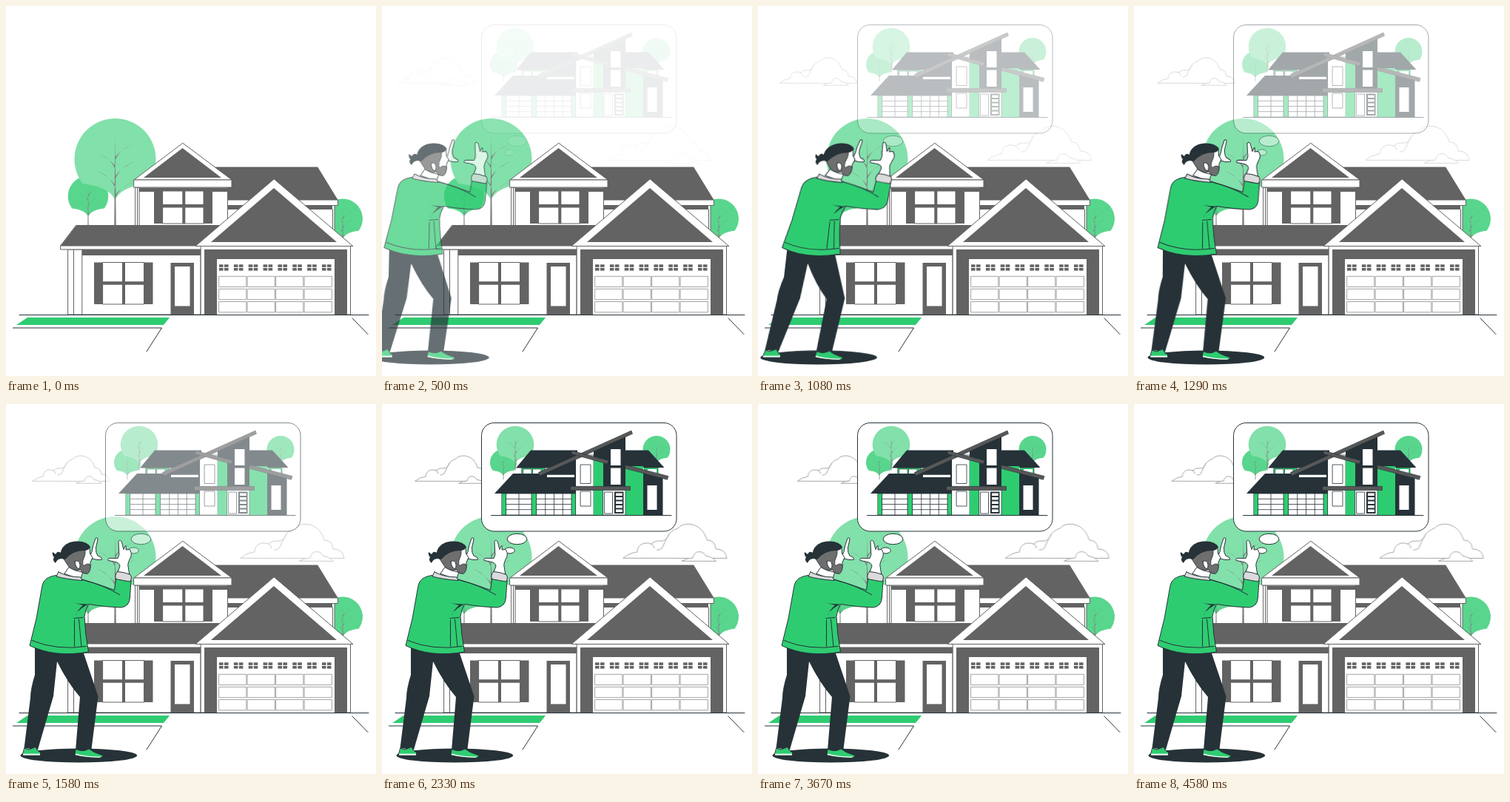
These frames come from a looping animation (500x500 px, 4.62 s). An HTML page:

```html
<!DOCTYPE html>
<html lang="en">
<head>
<meta charset="utf-8">
<title>Dream house</title>
<style>
html, body { margin: 0; width: 100%; height: 100%; overflow: hidden; background: #fff; }
svg { display: block; width: 100%; height: 100%; }
#man { transform-origin: 98px 332px; }
</style>
</head>
<body>
<svg id="stage" viewBox="0 0 500 500"></svg>
<script>
const GREEN = '#2ecc71', MID = '#58d68d', LIGHT = '#82e0aa';
const INK = '#263238', GRAY = '#636363', SLAB = '#585858', WHITE = '#fff';

// Shape helpers
const path = (d, fill = 'none', stroke = 'none', w = 1) =>
  `<path d="${d}" fill="${fill}" stroke="${stroke}" stroke-width="${w}" stroke-linejoin="round" stroke-linecap="round" vector-effect="non-scaling-stroke"/>`;
const poly = (pts, fill, stroke, w) => path(`M${pts}Z`, fill, stroke, w);
const box = (x1, y1, x2, y2, fill, stroke, w) =>
  path(`M${x1} ${y1}H${x2}V${y2}H${x1}Z`, fill, stroke, w);
const oval = (x, y, rx, ry, fill, stroke = 'none') =>
  `<ellipse cx="${x}" cy="${y}" rx="${rx}" ry="${ry}" fill="${fill}" stroke="${stroke}"/>`;
const group = (id, body) => `<g id="${id}">${body}</g>`;
const repeat = (n, fn) => Array.from({ length: n }, (_, i) => fn(i)).join('');

// Crown of radius 55 around 0,0 with trunk and tapered branches
function tree(x, y, r, color, foot = 90) {
  const branch = (by, dx, dy) =>
    `M0 ${by}Q${dx * .2} ${by + dy * .68} ${dx} ${by + dy}Q${dx * .38} ${by + dy * .72} 0 ${by - 5}Z`;
  const crown = 'M0 55C-7 41 -22 36 -44 33A55 55 0 1 1 44 33C22 36 7 41 0 55Z';
  const wood = `M0 -29L-1.3 ${foot}H1.3Z` + branch(2, 25, -22) + branch(14, -24, -22) +
    branch(28, 27, -25) + branch(40, -26, -25) + branch(53, 27, -23);
  return `<g transform="translate(${x} ${y}) scale(${r / 55})">${path(crown, color)}${path(wood, '#808080')}</g>`;
}

// Four-pane window between two shutters
function shutters(x1, y1, x2, y2, mx, my) {
  return box(x1, y1, x2, y2, GRAY) + box(x1 + 12, y1, x2 - 12, y2, WHITE, GRAY) +
    box(mx - 2, y1, mx + 2, y2, GRAY) + box(x1 + 12, my - 2.2, x2 - 12, my + 2.2, GRAY);
}

function house() {
  const rear = poly('283 218L421 218L448 262L290 262', GRAY, GRAY) +
    box(295, 269, 444, 325, WHITE, GRAY) + box(295, 270, 441, 275, GRAY) +
    path('M441.5 275V310', 'none', GRAY) + box(290, 262, 448.5, 269.5, WHITE, GRAY);
  const upper = box(175, 245, 299.5, 300, WHITE, GRAY) + box(180, 246, 299, 251, GRAY) +
    path('M177.5 245V297M180 245V297', 'none', GRAY) + shutters(200, 250, 279, 294, 240.3, 270.2) +
    poly('238.5 185.5L173 235H305', WHITE, GRAY) + poly('238.5 192L186 232H291', GRAY) +
    box(173, 235, 305, 245, WHITE, GRAY);
  const lower = box(84, 329, 263, 417, WHITE, GRAY) + box(103, 329, 263, 337, GRAY) +
    path('M91.5 329V417M102.8 329V417', 'none', GRAY) +
    poly('95 296.5H300L268 324H74', GRAY, GRAY) + box(74, 324, 265, 329, WHITE, GRAY) +
    shutters(119, 346.5, 198.5, 403, 159, 374.5) +
    box(222.5, 347, 254, 417, GRAY) + box(228, 352, 248.5, 405.5, WHITE);
  const garage = box(263.5, 324.5, 465.5, 417, WHITE, GRAY) + box(268, 329, 461, 417, GRAY) +
    box(285, 342, 444, 417, WHITE) +
    repeat(8, i => repeat(4, k => {
      const x = 288 + i * 19.85 + (k % 2) * 7, y = 349.3 + (k >> 1) * 4.7;
      return box(x, y, x + 5.6, y + 3.6, GRAY);
    })) +
    repeat(12, i => {
      const x = 288 + (i % 4) * 38.5, y = 365.3 + (i >> 2) * 17.1;
      return box(x, y, x + 36.8, y + 14.3, WHITE, '#8c8c8c', .8);
    }) +
    poly('362 234L256 324.5H468.5', WHITE, GRAY) + poly('362 246L277 319H447', GRAY);
  return rear + upper + lower + garage;
}

function ground() {
  return path('M18 417.5H490M9.5 435H210.5L190 467M468 422L489 443.5', 'none', INK) +
    poly('29 421H221L213 431H14', GREEN);
}

function cloud(x, y, s) {
  const c = '#a6a6a6';
  return `<g transform="translate(${x} ${y}) scale(${s})">` +
    path('M0 0Q6 -5 14 -6C14 -13 21 -17 28 -14Q32 -18 39 -17C43 -18 44 -20 46 -24C51 -30 56 -29 57 -32C66 -37 80 -33 84 -18Q92 -18 93 -9Q103 -9 104 0Z', WHITE, c) +
    path('M28 -14Q31 -13 31 -10M46 -24Q42 -17 39 -10Q37 -8 34 -8', 'none', c) +
    path('M59 3Q64 0 70 0C71 -8 80 -8 83 -2Q90 -1 93 3Z', WHITE, c) + '</g>';
}

function panel() {
  const slab = pts => poly(pts, SLAB, INK, .6);
  const door = (x1, x2, cols) => box(x1, 121, x2, 150, WHITE, INK, .8) +
    repeat(3, i => path(`M${x1} ${128.3 + i * 7.2}H${x2}`, 'none', INK, .8)) +
    repeat(cols - 1, i => path(`M${x1 + (x2 - x1) * (i + 1) / cols} 121V150`, 'none', INK, .8));
  const frame = `<rect x="134.5" y="25.5" width="263.5" height="146.5" rx="17" fill="${WHITE}" stroke="${INK}"/>`;
  const trees = tree(164, 79, 18, MID, 70) + tree(180, 55, 25.3, LIGHT, 75) + tree(371, 61.5, 18.5, MID, 70);
  const left = box(189, 86, 220, 98, GREEN, INK, .6) + box(191, 88, 202, 96, WHITE, INK, .6) +
    box(204, 88, 215, 96, WHITE, INK, .6) +
    poly('201 62.5H264V80L225 86.5H181', INK) +
    poly('177 94H213L262 74V121H152', INK) + box(223, 95.8, 260, 99, WHITE) +
    box(162, 121, 262, 150, GREEN, INK, .6) + door(168, 202, 2) + door(209, 256, 4);
  const right = box(355, 86, 373, 96, GREEN, INK, .6) + box(359, 88, 371, 96, WHITE) +
    poly('328 62.5H360L381.5 86H328', INK) +
    box(329, 84, 353, 150, GREEN) + poly('353 89L379.5 97V150H353', INK) +
    box(358.5, 110, 371.5, 143, WHITE);
  const tower = poly('262 75L329 42V150H262', WHITE) + poly('286 62L329 42V112H299V78L286 74', INK) +
    box(262, 69, 286, 112, WHITE, INK, .7) + box(268.5, 82, 282, 107.5, WHITE, INK, .8) +
    box(286, 74, 299, 112, GREEN) +
    box(309, 61, 322.5, 83, WHITE) + box(309, 86.5, 322.5, 109, WHITE) +
    box(262, 116, 286, 150, WHITE, INK, .7) + box(268.5, 118, 282, 138, WHITE, INK, .8) +
    box(286, 116, 299, 150, GREEN) + box(299, 116, 329, 150, WHITE, INK, .7) +
    box(301, 119, 311.5, 148, WHITE, INK, .8) + box(314, 118.5, 326.5, 148, INK) +
    repeat(5, i => box(316, 120.5 + i * 5.5, 324.8, 124 + i * 5.5, WHITE));
  const slabs = slab('211.5 92.5L337 36L338.5 40.2L213.5 97') + slab('257 63.3L306 76.5L304.5 81L256 67.5') +
    slab('329.5 82.5L387 97.5L385.5 102.3L328.5 87') + box(255, 111.3, 335.5, 116.5, SLAB, INK, .6);
  return frame + trees + left + right + tower + slabs + path('M147.5 150.5H391', 'none', INK);
}

function man() {
  const legs = path('M39 328V366Q33 385 33 397L24.5 465L43 467L64 395L69 348Q84 378 100 396L94 468L115 470L124.5 395L104 334Z', INK);
  const shoes = path('M25 465L31 467L40 463.5Q42 469 46.5 471V474.8H22.5Z', GREEN, INK) +
    path('M23 472.7H46V474.6H23Z', WHITE) +
    path('M94.5 466.5Q104 471 112 466Q118 471 130 474.5Q132 477.5 127 478.3Q108 478 93 474.5Z', GREEN, INK) +
    path('M94 472.5Q110 477 128 476.5Q128 477.8 125 477.8Q108 477.5 94 474.3Z', WHITE);
  const far = path('M113 207Q117 199 117.5 192L121 181.5Q124.5 179 123.8 184L121.5 194Q121 201 124 205Q131 208 129.5 210.3Q123 211.5 117 209Q114 213 112 212Z', WHITE, INK);
  const near = path('M150 230L154 219Q153 214 146 213L138 211.5Q137 208.5 141 208.3L151 208.5Q154 204 152.5 198L152 185.5Q155 182.5 156.5 187L159 196.5L161.5 191.5Q163 192 162 197L167 196.5Q170.5 201 169 206Q164 215 165 219L167 232Z', WHITE, INK);
  const neck = path('M79 229L86 219L104 226L101 237Z', WHITE, INK);
  const jacket = path('M68 231.5C57 233 50 237 48.5 248L41 290L32 326.5Q66 343 111.5 335Q107 312 106 287Q107 279 111.5 270.5Q135 274.5 155 275Q167 274 167.5 261L169 238L149 234L146.5 251.5Q124 243 103 237Z', GREEN, INK) +
    path('M103 237.5Q133 245 154 258M35 319.5Q68 333.5 108.5 327.5M92 289.5L104 288.5M92.5 292V327.5M98.5 291L102 328', 'none', INK) +
    path('M92.5 268.5Q101 271 111.5 270.5Q104 274 100 278Q95 281 94 286Q97 278 104 272Z', INK);
  const trims = poly('71 227L68 233Q82 237 103 238.5L101 234Q84 234 71 227', '#dbdbdb', INK) +
    path('M150.5 226.5Q159 227 168 230.5Q171 235 167.5 240Q158 238.5 148.5 236.5Q146.5 231 150.5 226.5Z', '#dbdbdb', INK);
  const head = path('M78 208L86 221Q94 226 102 227Q108 231 112 227Q115 221 114 214L117 207.5L113.5 202L113 194Z', WHITE, INK) +
    path('M76 206Q90 197 107 197Q108 204 104 211Q103 216 105 219Q109 214.5 114 217Q115 226 110 229.5Q103 229 100.5 224Q93 226 86 221Z', '#6e6e6e', INK, .8) +
    path('M93 213C98 209 102 216 99 223Q94 222 93 213Z', WHITE, INK) +
    path('M75 209C71 199 77 187 94 185.5Q109 184.5 114 193Q112 198 106 198Q90 198 80 210Z', INK) +
    path('M75 202Q70 197 67 203L63 200Q62 204 65 207Q62 211 67 215Q69 209 75 209Z', INK);
  return oval(98.3, 475, 78.8, 9.5, INK) + legs + shoes + neck + far + near + jacket + trims + head;
}

document.getElementById('stage').innerHTML =
  tree(111, 257, 27.3, MID, 84) + tree(147.5, 207, 55, LIGHT) + tree(455, 287.5, 27, MID, 60) +
  house() + ground() +
  group('clouds', cloud(0, 104, 1) + cloud(281, 208, 1.345)) +
  group('panel', panel()) +
  group('bubbles', oval(182.5, 182.5, 13.3, 7.2, WHITE, INK) + oval(172.5, 198, 6.8, 4, WHITE, INK)) +
  group('man', man());

// Motion: each table row is [time in ms, properties]
const LOOP = 4620;
function play(id, rows) {
  const frames = rows.map(([ms, props]) => ({ offset: ms / LOOP, ...props }));
  return document.getElementById(id).animate(frames, { duration: LOOP, iterations: Infinity });
}

const spring = 'cubic-bezier(.36,-.01,.5,1.38)';
const hidden = { transform: 'translate(-100px,0) skewX(20deg)', opacity: 0 };
const rest = { transform: 'translate(0px,0) skewX(0deg)', opacity: 1 };
const fade = [[0, 0], [200, 0], [710, .15], [1080, .32], [1580, .57], [2300, 1], [LOOP, 1]]
  .map(([ms, opacity]) => [ms, { opacity }]);
const drift = Array.from({ length: 34 }, (_, i) => {
  const ms = i * LOOP / 33;
  const x = 53.6 - 21 * (1 - Math.cos(Math.PI * (ms - 3830) / 5000));
  return [ms, { transform: `translate(${x.toFixed(2)}px,0)` }];
});

const all = [
  play('man', [
    [0, hidden],
    [150, { ...hidden, easing: spring }],
    [880, { transform: 'translate(0px,0) skewX(-10deg)', opacity: 1, easing: spring }],
    [1520, rest],
    [LOOP, rest]
  ]),
  ...['clouds', 'panel', 'bubbles'].map(id => play(id, fade)),
  play('clouds', drift)
];
const start = document.timeline.currentTime ?? 0;
all.forEach(a => { a.startTime = start; });
</script>
</body>
</html>
```
